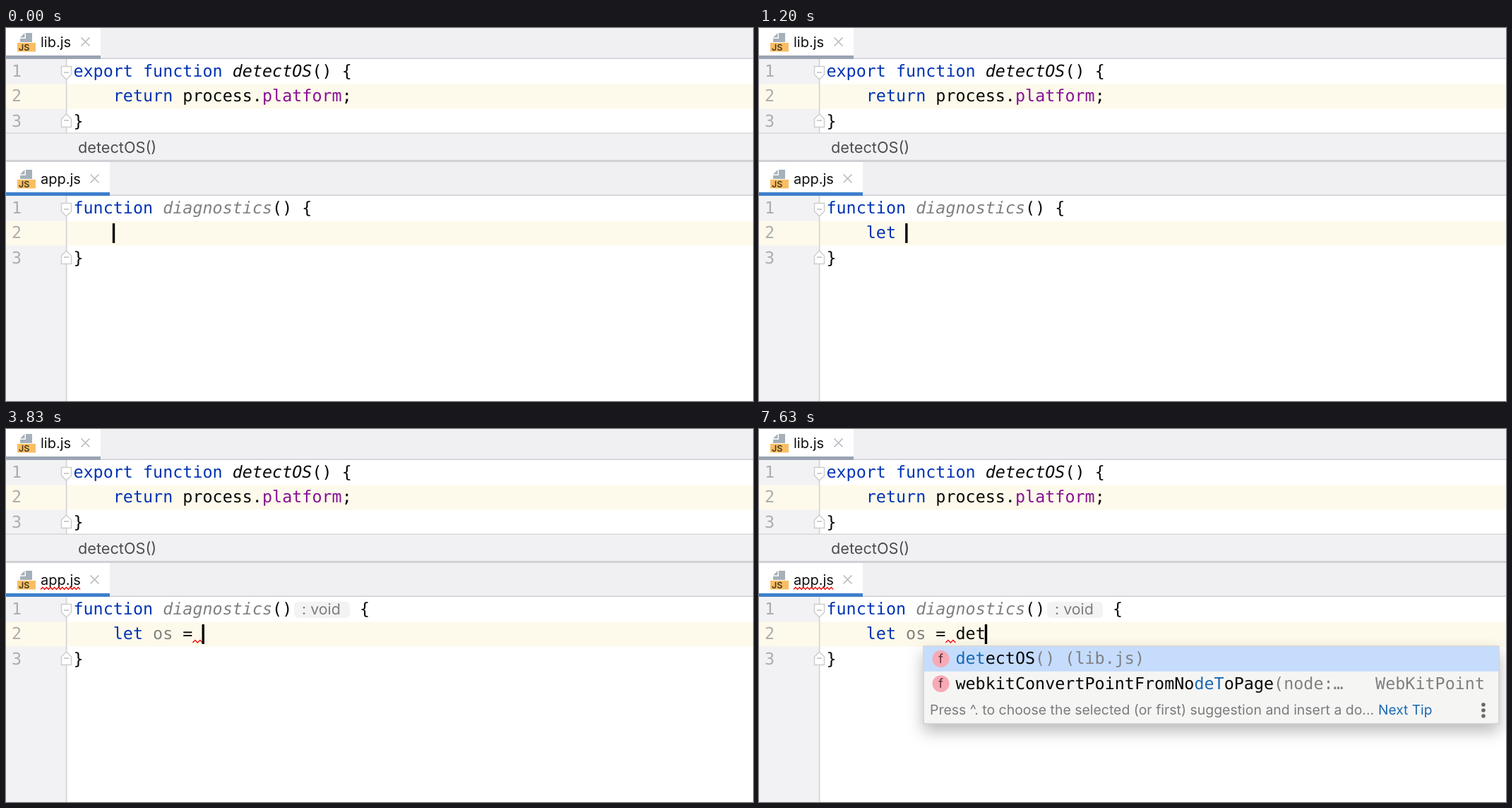
An HTML page for the animation above (8 s loop, 1058 px wide and 529 px high).

```html
<!DOCTYPE html>
<html lang="en">
<head>
<meta charset="utf-8">
<title>Code completion</title>
<style>
  html, body { margin: 0; width: 100%; height: 100%; overflow: hidden; background: #fff; }
  svg { display: block; width: 100%; height: 100%; }
  text { white-space: pre; fill: #080808; text-rendering: geometricPrecision; }
  .code { font: 23.4px "DejaVu Sans Mono", "Noto Sans Mono", monospace; }
  .ui { font-family: Inter, "Open Sans", sans-serif; }
  .k { fill: #0033b3; }
  .g { fill: #808080; }
  .p { fill: #871094; }
  .n { fill: #adadad; }
  .m { fill: #1a69b3; }
  .i { font-style: italic; }
  .b { font-weight: bold; }
  .wave { fill: none; stroke: #f01010; stroke-width: 1.4; }
</style>
</head>
<body>
<svg viewBox="0 0 1058 529" xmlns="http://www.w3.org/2000/svg">
  <defs>
    <filter id="shadow" x="-10%" y="-10%" width="120%" height="150%">
      <feDropShadow dx="0" dy="10" stdDeviation="11" flood-color="#000" flood-opacity=".28"/>
    </filter>
  </defs>
  <g id="base"></g>
  <g id="live"></g>
</svg>
<script>
const LOOP = 8000, CHAR = 14.08, ROW = 35.3, LEFT = 95.4, POP_TOP = 308;
const col = n => LEFT + n * CHAR;

const rect = (x, y, w, h, fill, extra = '') =>
  `<rect x="${x}" y="${y}" width="${w}" height="${h}" fill="${fill}" ${extra}/>`;
const path = (d, extra) => `<path d="${d}" ${extra}/>`;
const circle = (x, y, r, fill) => `<circle cx="${x}" cy="${y}" r="${r}" fill="${fill}"/>`;
const span = (cls, s) => `<tspan class="${cls}">${s}</tspan>`;
const code = (x, y, s, cls = '', extra = '') =>
  `<text class="code ${cls}" x="${x}" y="${y}" ${extra}>${s}</text>`;
const ui = (x, y, size, s, fill, extra = '') =>
  `<text class="ui" x="${x}" y="${y}" font-size="${size}" style="fill:${fill}" ${extra}>${s}</text>`;

function wave(x, y, width, step, height) {
  let d = `M${x} ${y}`;
  for (let i = 1; i * step <= width + 0.1; i++) d += `L${x + i * step} ${i % 2 ? y - height : y}`;
  return path(d, 'class="wave"');
}

function fold(y, dir) {
  const mid = y + 9.5, tip = mid + dir * 9.5, flat = mid - dir * 9;
  return path(`M78.5 ${flat}H92.5V${mid + dir * 2.5}L85.5 ${tip}L78.5 ${mid + dir * 2.5}Z`,
    'fill="#fff" stroke="#cdcdcf" stroke-width="1.5"') +
    rect(82, mid - 1.2, 7, 1.5, '#bfbfc1');
}

function tab(y, width, name, accent) {
  const x = width - 21.5, c = y + 19.5;
  return rect(0, y - 4, 1058, 48, '#f0f0f3') +
    rect(0, y + 42.5, 1058, 1.5, '#cfd0d3') +
    rect(0, y - 4, width, 44, '#fff') +
    rect(0, y + 39, width, 5, accent) +
    path(`M28 ${y + 7}H37V${y + 20}H20V${y + 15}H28ZM26.5 ${y + 7}V${y + 13.5}H20Z`, 'fill="#a5b0b9"') +
    rect(16, y + 21, 26, 12.5, '#f8be64') +
    ui(18, y + 31.5, 12.5, 'JS', '#4a3a1c', 'font-weight="600"') +
    ui(49, y + 26.5, 20, name, '#111') +
    path(`M${x - 6} ${c - 6}l12 12m0 -12l-12 12`, 'stroke="#b8bbc0" stroke-width="1.6"');
}

function editor(top, height) {
  let s = rect(0, top, 1058, height, '#fff') +
    rect(0, top, 85, height, '#f2f2f5') +
    rect(0, top + 35.5, 1058, 35, '#fefaeb') +
    rect(84.8, top, 1.6, height, '#d2d2d4') +
    fold(top + 10, 1) + fold(top + 78, -1);
  for (let i = 0; i < 3; i++) s += code(8, top + 25 + i * ROW, i + 1, 'n');
  return s + code(col(0), top + 25 + 2 * ROW, '}');
}

const base = tab(0, 134, 'lib.js', '#9aa4b3') + editor(44, 105) +
  code(col(0), 69, span('k', 'export function ') + span('i', 'detectOS') + '() {') +
  code(col(4), 104.3, span('k', 'return ') + 'process.' + span('p', 'platform') + ';') +
  rect(0, 149, 1058, 38, '#f1f1f3') + rect(0, 148.5, 1058, 1.2, '#d2d2d4') +
  ui(102, 176.5, 21.7, 'detectOS()', '#4d4d4f') +
  tab(194, 147, 'app.js', '#3f7fcd') +
  rect(0, 187, 1058, 3, '#d0d1d4') +
  editor(238, 291);

const icons = {
  v: (x, y) => circle(x, y, 12, '#f6c97f') + ui(x, y + 5.5, 17, 'v', '#5c4a2c', 'text-anchor="middle" font-weight="500"'),
  f: (x, y) => circle(x, y, 12, '#f7aab6') + ui(x, y + 6, 18, 'f', '#5c3038', 'text-anchor="middle"'),
  o: (x, y) => circle(x + 4, y - 4, 8, '#9ccb8b') + circle(x + 1, y, 8.5, '#f5f5f4') +
    circle(x + 1.5, y, 7.5, '#f6c97f') + circle(x - 3, y + 4, 9.5, '#f5f5f4') + circle(x - 4, y + 4.5, 8.5, '#7dcbe8')
};

// Row: [label with [matched] parts, icon, grey tail, type]
const dom = (label, type) => [label, 'v', ' (DOM)', type];
const word = label => [label, 'b'];
const wide = { x: 106, w: 914, col: 4, icon: 130.5, typeX: 999 };
const plain = { x: 199, w: 900, col: 8 };
const popups = {
  l: { ...wide, bar: 42, rows: [word('[l]et'), dom('[l]ength', 'number'), dom('[l]ocalStorage', 'Storage'),
    ['[l]ocation', 'o'], dom('[l]ocationbar', 'BarProp'), word('c[l]ass'), word('de[l]ete')] },
  le: { ...wide, bar: 60, rows: [word('[le]t'), dom('[le]ngth', 'number'), word('de[le]te'),
    ['Fi[le]', 'o'], ['Fi[le]List', 'o'], ['Fi[le]Reader', 'o'], ['Sty[le]Sheet', 'o']] },
  let: { ...wide, tip: true, rows: [word('[let]'), word('de[let]e'), dom('comp[let]e', 'boolean')] },
  o: { ...plain, rows: ['[o]bjectStore', '[o]fStreamError', '[o]nlyState', '[o]scillatorNode',
    '[o]scillatorOptions', '[o]nSaveAffectedFileListRequest', '[o]nSaveAffectedFileListResult'].map(s => [s]) },
  os: { ...plain, rows: ['[os]cillatorNode', '[os]cillatorOptions', '[o]bject[S]tore', '[o]f[S]treamError',
    '[o]nly[S]tate', '[o]n[S]aveAffectedFileListRequest', '[o]n[S]aveAffectedFileListResult'].map(s => [s]) },
  det: { x: 233, w: 815, col: 13, icon: 257.5, typeX: 1028, tip: true, rows: [
    ['[det]ectOS', 'f', '() (lib.js)'],
    ['webkitConvertPointFromNo[deT]oPage', 'f', '(node:…', 'WebKitPoint']] }
};
popups.osMore = { ...popups.os, rows: [...popups.os.rows.slice(0, 2), ['[Os]cillatorNode'],
  ['[Os]cillatorOptions'], ...popups.os.rows.slice(2, 5)] };

function popup(p, active) {
  const bottom = POP_TOP + p.rows.length * ROW + (p.tip ? 39.4 : 0);
  let s = rect(p.x, POP_TOP, p.w, bottom - POP_TOP, '#f5f5f4', 'stroke="#bdbdbf" filter="url(#shadow)"') +
    rect(p.x + 0.5, POP_TOP + 0.5, p.w - 1, 35.3, active ? '#c5dcfc' : '#e0e0e2');
  p.rows.forEach(([label, icon, tail = '', type], i) => {
    const y = POP_TOP + 25.3 + i * ROW;
    const text = label.replace(/\[(.+?)\]/g, (_, hit) => span('m', hit));
    s += code(col(p.col), y, text + span('g', tail), icon === 'b' ? 'b' : '');
    if (icons[icon]) s += icons[icon](p.icon, y - 7.3);
    if (type) s += code(p.typeX, y, type, 'g', 'text-anchor="end"');
  });
  if (p.bar) s += rect(1003, 312, 13, p.bar, '#747476', 'rx="6"');
  if (p.tip) {
    const y = bottom - 13, right = p.x + p.w;
    s += ui(p.x + 9, y, 19.45, 'Press ^. to choose the selected (or first) suggestion and insert a do...', '#7b7b7d') +
      ui(p.x + 644, y, 19.2, 'Next Tip', '#1a69b3');
    for (const d of [-8, 0, 8]) s += circle(right - 22, y - 6 + d, 2.8, '#69696b');
  }
  return s;
}

const key = s => span('k', s), dim = s => span('g', s);
const assign = key('let ') + dim('os') + ' = ';
// Each step changes some fields of the state; err is the column of the squiggle.
const steps = [
  [0, { line: '', at: 4, caret: true, popup: null, hint: false, tabErr: false, err: 0, brace: false, active: false }],
  [500, { line: 'l', at: 5 }],
  [600, { popup: 'l' }],
  [630, { line: 'le', at: 6 }],
  [660, { popup: 'le' }],
  [860, { line: key('let'), at: 7, popup: 'let' }],
  [1200, { line: key('let '), at: 8, popup: null }],
  [1530, { hint: true }],
  [1600, { tabErr: true, err: 7, brace: true }],
  [2060, { line: key('let ') + 'o', at: 9 }],
  [2160, { popup: 'o' }],
  [2200, { line: key('let ') + 'os', at: 10 }],
  [2260, { popup: 'os' }],
  [2530, { popup: 'osMore' }],
  [2800, { line: key('let ') + 'os ', at: 11 }],
  [2830, { popup: null }],
  [3130, { line: key('let ') + dim('os '), err: 0 }],
  [3200, { tabErr: false, brace: false }],
  [3460, { line: key('let ') + dim('os ') + '=', at: 12 }],
  [3600, { line: assign, at: 13 }],
  [3760, { err: 12 }],
  [3830, { tabErr: true }],
  [4360, { line: assign + 'det', at: 16, popup: 'det', caret: false }],
  [4830, { caret: true }],
  [5330, { caret: false }],
  [5830, { caret: true }],
  [6330, { caret: false }],
  [6460, { active: true }],
  [6600, { caret: true }],
  [7130, { caret: false }],
  [7630, { caret: true }]
];
let last = {};
const states = steps.map(([time, change]) => ({ time, ...(last = { ...last, ...change }) }));

function draw(s) {
  let out = code(col(0), 263, key('function ') + span('g i', 'diagnostics') + '()') +
    code(col(s.hint ? 28.8 : 23), 263, '{') +
    code(col(4), 298.3, s.line);
  if (s.hint) out += rect(408, 245, 79, 23, '#f3f3f3', 'rx="6"') + ui(419, 263, 21.4, ': void', '#7d7d7f');
  if (s.brace) out += rect(109.5, 309, 14, 35, '#f7e8bb');
  if (s.tabErr) out += wave(49, 227.5, 56, 2.8, 3);
  if (s.err) out += wave(col(s.err), 303, CHAR, CHAR / 4, 3.5);
  if (s.caret) out += rect(col(s.at) - 0.9, 277, 3.4, 28, '#000');
  if (s.popup) out += popup(popups[s.popup], s.active);
  return out;
}

const live = document.getElementById('live');
document.getElementById('base').innerHTML = base;
const start = performance.now();
let shown = null;
function tick() {
  const t = Math.max(0, performance.now() - start) % LOOP;
  const state = states.findLast(s => s.time <= t);
  if (state !== shown) live.innerHTML = draw(shown = state);
  requestAnimationFrame(tick);
}
tick();
</script>
</body>
</html>
```
